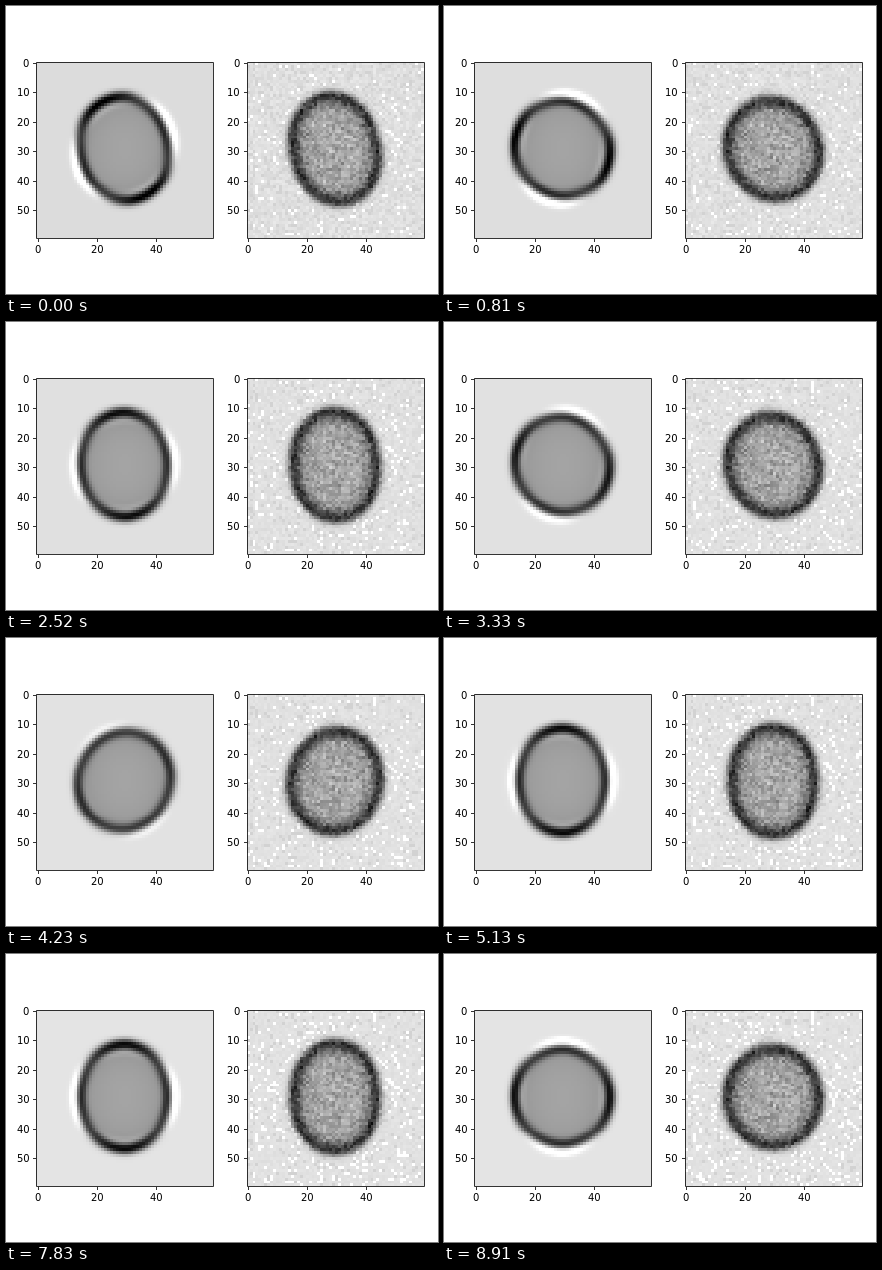
An HTML page with a canvas that plays this animation: 432x288 px, repeating every 9000 ms.

```html
<!DOCTYPE html>
<html>
<head>
<meta charset="utf-8">
<style>
html, body { margin: 0; width: 100%; height: 100%; overflow: hidden; background: #fff; }
canvas, svg { position: absolute; left: 0; top: 0; width: 432px; height: 288px; }
text { font: 10px "DejaVu Sans", sans-serif; }
path { stroke: #000; stroke-width: .8; fill: none; }
</style>
</head>
<body>
<canvas id="view" width="432" height="288"></canvas>
<svg id="axes" viewBox="0 0 432 288"></svg>
<script>
const N = 60, CELL = 2.95, STEP = 90, STEPS = 100, TOP = 56.5, LEFT = [30.6, 241.1];
const ctx = document.getElementById('view').getContext('2d');

function drawAxes() {
  let out = '';
  const line = d => out += `<path d="${d}"/>`;
  const label = (x, y, n) => out += `<text x="${Math.round(x)}" y="${y}">${n}</text>`;
  const width = n => n < 10 ? 6.36 : 12.72;
  for (const left of LEFT) {
    const x0 = Math.floor(left);
    line(`M${x0 + .5} 56.5h177v176h-177z`);
    for (let n = 0; n <= 50; n += 10) {
      const y = Math.floor(57.5 + n * 2.94);
      line(`M${x0} ${y + .5}h-3`);
      label(left - 7 - width(n), y + 4, n);
    }
    for (let n = 0; n <= 40; n += 20) {
      const x = left + (n + .5) * CELL;
      line(`M${Math.floor(x) + .5} 233v3`);
      label(x - width(n) / 2, 247, n);
    }
  }
  document.getElementById('axes').innerHTML = out;
}

let seed = 7;
function random() {
  seed = (Math.imul(seed, 1664525) + 1013904223) >>> 0;
  return seed / 4294967296;
}
const gauss = () => (random() + random() + random() - 1.5) * 2;
const noise = () => Array.from({ length: N * N }, gauss);
const grain = noise(), swayA = noise(), swayB = noise();

const bell = x => Math.exp(-x * x);
const smooth = (a, b, x) => {
  x = Math.min(1, Math.max(0, (x - a) / (b - a)));
  return x * x * (3 - 2 * x);
};
const mix = (a, b, k) => a + (b - a) * k;

// Clean cell: a fixed mean membrane plus a linear response to the bulge,
// which darkens the outside where it swells and whitens it where it shrinks
function cleanCell(i, j, m) {
  const x = i - 29.4, y = j - 29, phi = Math.atan2(y, x);
  const c2 = Math.cos(2 * phi), s2 = Math.sin(2 * phi);
  const bulge = -1.35 * m.stretch * c2 - m.tilt * s2;
  const d = Math.hypot(x, y) - (16.5 - .8 * c2);
  const inner = 165 - 24 * Math.exp(Math.min(0, d) / 5);
  const mean = mix(inner, 229 - 9 * m.fade, smooth(-1.5, 2.5, d)) - 95 * bell((d + .3) / 1.9);
  return mean - bulge * (90 * bell((d - 1.1) / 1.5) - 40 * bell((d + 1.9) / 1.3));
}

// Noisy cell: broader membrane and speckled background
function noisyCell(i, j, m) {
  const x = i - 29.5, y = j - 29.2, phi = Math.atan2(y, x);
  const r = 16.6 - (1.2 + .85 * m.stretch) * Math.cos(2 * phi)
    - .8 * m.tilt * Math.sin(2 * phi);
  const d = Math.hypot(x, y) - r, k = j * N + i;
  const n = grain[k] + .35 * (swayA[k] * m.stretch + swayB[k] * m.tilt);
  const speck = n > 1.2 + .6 * m.fade ? 255
    : n < -1.4 ? 210 : 226 - 3 * m.fade + (3 + 3 * m.fade) * n;
  const inner = 168 - 34 * Math.exp(Math.min(0, d) / 5) + 16 * n;
  return mix(inner, speck, smooth(-.5, 2.6, d)) - 84 * bell((d + .7) / 2.3);
}

function drawPanel(left, shade, motion) {
  const col = n => Math.floor(left + n * CELL), row = n => Math.floor(TOP + n * 2.94);
  for (let j = 0; j < N; j++) {
    for (let i = 0; i < N; i++) {
      const v = Math.round(Math.min(255, Math.max(0, shade(i, j, motion))));
      ctx.fillStyle = `rgb(${v},${v},${v})`;
      ctx.fillRect(col(i), row(j), col(i + 1) - col(i), row(j + 1) - row(j));
    }
  }
}

function draw(n) {
  const wave = peak => Math.cos(2 * Math.PI * (n - peak) / 30);
  const fade = Math.exp(-n / 45);
  const motion = { stretch: wave(56), tilt: 1.75 * fade * wave(19), fade };
  drawPanel(LEFT[0], cleanCell, motion);
  drawPanel(LEFT[1], noisyCell, motion);
}

let shown = -1;
const start = performance.now();
function tick() {
  const n = Math.floor((performance.now() - start) / STEP) % STEPS;
  if (n !== shown) draw(shown = n);
  requestAnimationFrame(tick);
}
drawAxes();
tick();
</script>
</body>
</html>
```
